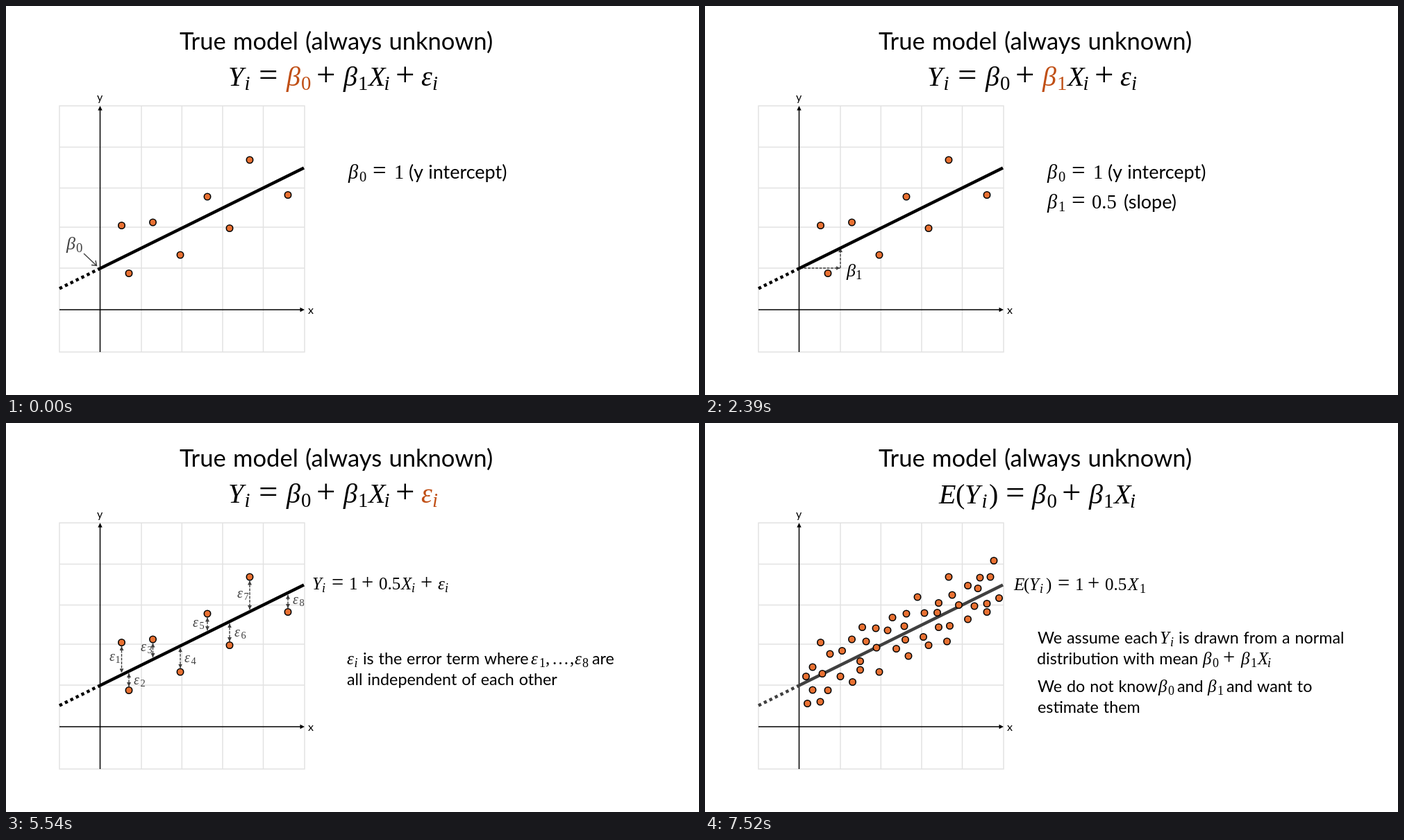
Write an HTML page that moves like this. It is 998x561 px and loops after 8 s.

```html
<!DOCTYPE html>
<html lang="en">
<head>
<meta charset="utf-8">
<title>True model</title>
<style>
  html, body { margin: 0; width: 100%; height: 100%; overflow: hidden; background: #fff; }
  svg { display: block; width: 100vw; height: 100vh; }
  text { white-space: pre; }
  .sans { font-family: Lato, sans-serif; word-spacing: .04em; }
  .math { font-family: 'Liberation Serif', serif; }
  .grid { fill: none; stroke: #e2e2e2; stroke-width: 1.5; }
  .axis { stroke: #000; stroke-width: 1.5; }
  .dot { fill: #e97132; stroke: #000; stroke-width: 1.6; }
  .grey { fill: #404040; }
  .thin { fill: none; stroke: #404040; stroke-width: 1.4; }
  .dash { stroke-dasharray: 4 1.5; }
  .fit { stroke: #000; stroke-width: 4.5; }

  .step { animation: 8s step-end infinite; }
  #intercept { animation-name: intercept; }
  #slope { animation-name: slope; }
  #values { animation-name: values; }
  #error { animation-name: error; }
  #sample { animation-name: sample; }
  #mean { animation-name: mean; }
  #line { animation-name: line; }
  .hot0 { animation: hot0 8s step-end infinite; }
  .hot1 { animation: hot1 8s step-end infinite; }
  .hot2 { animation: hot2 8s step-end infinite; }

  @keyframes intercept { 0% { visibility: visible } 6.25%, 100% { visibility: hidden } }
  @keyframes slope { 0% { visibility: hidden } 6.25% { visibility: visible } 45.625%, 100% { visibility: hidden } }
  @keyframes values { 0% { visibility: visible } 45.625%, 100% { visibility: hidden } }
  @keyframes error { 0% { visibility: hidden } 45.625% { visibility: visible } 85%, 100% { visibility: hidden } }
  @keyframes sample { 0% { visibility: visible } 85%, 100% { visibility: hidden } }
  @keyframes mean { 0% { visibility: hidden } 85%, 100% { visibility: visible } }
  @keyframes line { 0% { stroke: #000 } 85%, 100% { stroke: #404040 } }
  @keyframes hot0 { 0% { fill: #c04f15 } 6.25%, 100% { fill: #000 } }
  @keyframes hot1 { 0% { fill: #000 } 6.25% { fill: #c04f15 } 45.625%, 100% { fill: #000 } }
  @keyframes hot2 { 0% { fill: #000 } 45.625%, 100% { fill: #c04f15 } }
</style>
</head>
<body>
<svg viewBox="0 0 998 561">
  <defs>
    <marker id="tip" viewBox="0 0 6 6" refX="6" refY="3" markerWidth="6" markerHeight="6"
            markerUnits="userSpaceOnUse" orient="auto-start-reverse">
      <path d="M0 0L6 3L0 6z" fill="#404040"/>
    </marker>
  </defs>
  <path class="grid" d="M77 144H430V499H77zM195 144V499M253.3 144V499M312 144V499M370.5 144V499M77 203.5H430M77 262.5H430M77 319H430M77 378H430"/>
  <path class="axis" d="M135.5 499V148M77 438H426"/>
  <path d="M135.5 144l3.2 6.5h-6.4zM430 438l-6.5 -3.2v6.4z"/>
  <g id="base"></g>
  <g id="slope" class="step">
    <path class="thin dash" d="M137 378H194.5" marker-end="url(#tip)"/>
    <path class="thin dash" d="M195 378V349" marker-end="url(#tip)"/>
  </g>
  <g id="line" class="fit step">
    <path d="M77 407.5L135.5 378.5" stroke-dasharray="4.4"/>
    <path d="M135.5 378.5L429 233.5"/>
  </g>
  <g id="intercept" class="step">
    <path class="thin" d="M112 357L130.5 374.5M123 373.5L130.5 374.5L129 367"/>
  </g>
  <g id="values" class="step"></g>
  <g id="error" class="step"></g>
  <g id="sample" class="step"></g>
  <g id="mean" class="step"></g>
  <g id="dots"></g>
</svg>
<script>
const SVG = 'http://www.w3.org/2000/svg';
const pen = document.createElement('canvas').getContext('2d');

function add(id, tag, attrs, content = '') {
  const el = document.createElementNS(SVG, tag);
  for (const key in attrs) el.setAttribute(key, attrs[key]);
  el.textContent = content;
  document.getElementById(id).append(el);
}

// Puts the visible left edge of the glyphs at x.
function put(id, str, x, y, size, family, style, cls) {
  pen.font = `${style} ${size}px ${family}`;
  const left = pen.measureText(str).actualBoundingBoxLeft;
  add(id, 'text', { x: x + left, y, 'font-size': size, 'font-style': style, class: cls }, str);
}

const sans = (id, str, x, y, size) =>
  put(id, str, x, y, size, 'Lato, sans-serif', 'normal', 'sans');

// spec: "glyph x glyph x ..."; a leading underscore makes a subscript.
function math(id, size, y, spec, cls = '') {
  const parts = spec.split(' ');
  for (let i = 0; i < parts.length; i += 2) {
    const sub = parts[i][0] === '_';
    const str = sub ? parts[i].slice(1) : parts[i];
    const scale = sub ? .72 : /[+=]/.test(str) ? 1.22 : 1;
    const style = /[A-Za-zβε]/.test(str) ? 'italic' : 'normal';
    put(id, str, +parts[i + 1], y + (sub ? size * .15 : 0), size * scale,
      "'Liberation Serif', serif", style, 'math ' + cls);
  }
}

const fitY = x => 378.5 - (x - 135.5) * .494;
const dot = (id, [cx, cy]) => add(id, 'circle', { cx, cy, r: 4.7, class: 'dot' });

// Title and axes
sans('base', 'True model (always unknown)', 250, 63, 34.6);
sans('base', 'y', 131, 137, 16);
sans('base', 'x', 435, 444, 16);

// Headline formula
math('sample', 40, 115, 'Y 322 _i 344.5 = 366 + 449 X 520 _i 545.5 + 563');
math('sample', 40, 115, 'β 403 _0 426', 'hot0');
math('sample', 40, 115, 'β 485 _1 509', 'hot1');
math('sample', 40, 115, 'ε 598 _i 615', 'hot2');
math('mean', 40, 116, 'E 336 ( 362 Y 376 _i 399.5 ) 410 = 435 β 470 _0 493.5 + 516 β 552 _1 576 X 587 _i 613');

// Intercept and slope
math('intercept', 26, 351, 'β 86 _0 101', 'grey');
math('slope', 26, 390, 'β 203 _1 218');
math('values', 28.5, 249, 'β 492 _0 509 = 529 1 561');
sans('values', '(y intercept)', 581, 249, 27);
math('slope', 28.5, 292, 'β 492 _1 510 = 529 0.5 558');
sans('slope', '(slope)', 604, 292, 27);

// Error terms
const sample = [[166.5, 316.5], [177, 385.5], [211.5, 312], [251, 359], [290, 275], [322, 320.5], [351, 222], [406, 272.5]];
const labels = [[149, 343], [184, 377], [194, 329], [257, 345], [269, 294], [329, 308], [333, 252], [413, 261]];
sample.forEach(([x, y], i) => {
  dot('dots', [x, y]);
  const side = Math.sign(fitY(x) - y);
  add('error', 'path', {
    d: `M${x} ${y + side * 5.5}V${fitY(x) - side * 3}`, class: 'thin dash',
    'marker-start': 'url(#tip)', 'marker-end': 'url(#tip)'
  });
  const [lx, ly] = labels[i];
  math('error', 20, ly, `ε ${lx} _${i + 1} ${lx + 9.5}`, 'grey');
});
math('error', 25, 240, 'Y 442 _i 456 = 470 1 496 + 513 0.5 537 X 568 _i 585 + 598 ε 622 _i 633');
math('error', 25, 348, 'ε 491 _i 502.5 ε 756 _1 769 , 777 … 788 , 812 ε 819 _8 830');
sans('error', 'is the error term where', 515, 348, 23.3);
sans('error', 'are', 844, 348, 23.3);
sans('error', 'all independent of each other', 491, 378, 23.3);

// Mean of the population
const more = [
  [416, 198.5], [396, 223], [411, 222], [378.5, 234.5], [393, 238.5], [423.5, 252.5], [356, 248],
  [306, 251], [336.5, 259.5], [365.5, 262.5], [388, 264], [406, 260.5], [316, 274], [334.5, 273.5],
  [270, 280.5], [378.5, 283], [287, 293], [336.5, 294.5], [352.5, 292.5], [226.5, 294.5], [246, 296],
  [263, 299], [314.5, 308.5], [288.5, 312.5], [232, 315], [348.5, 315], [247, 324], [275.5, 325.5],
  [197.5, 328.5], [180, 333], [293, 336], [223.5, 343.5], [155, 352], [223.5, 356], [145.5, 365.5],
  [169, 361.5], [195, 365.5], [212.5, 373.5], [155, 385], [147.5, 404.5], [166, 402]
];
more.forEach(p => dot('mean', p));
math('mean', 25, 241, 'E 444 ( 460 Y 468 _i 483 ) 491 = 509 1 535 + 552 0.5 576 X 608 _1 627');
sans('mean', 'We assume each', 479, 318, 23.3);
math('mean', 25, 318, 'Y 656 _i 671');
sans('mean', 'is drawn from a normal', 683, 318, 23.3);
sans('mean', 'distribution with mean', 479, 348, 23.3);
math('mean', 25, 348, 'β 716 _0 731 + 747 β 771 _1 787 X 795 _i 811');
sans('mean', 'We do not know', 479, 388, 23.3);
math('mean', 25, 388, 'β 652 _0 667 β 723 _1 739');
sans('mean', 'and', 680, 388, 23.3);
sans('mean', 'and want to', 751, 388, 23.3);
sans('mean', 'estimate them', 479, 418, 23.3);
</script>
</body>
</html>
```
